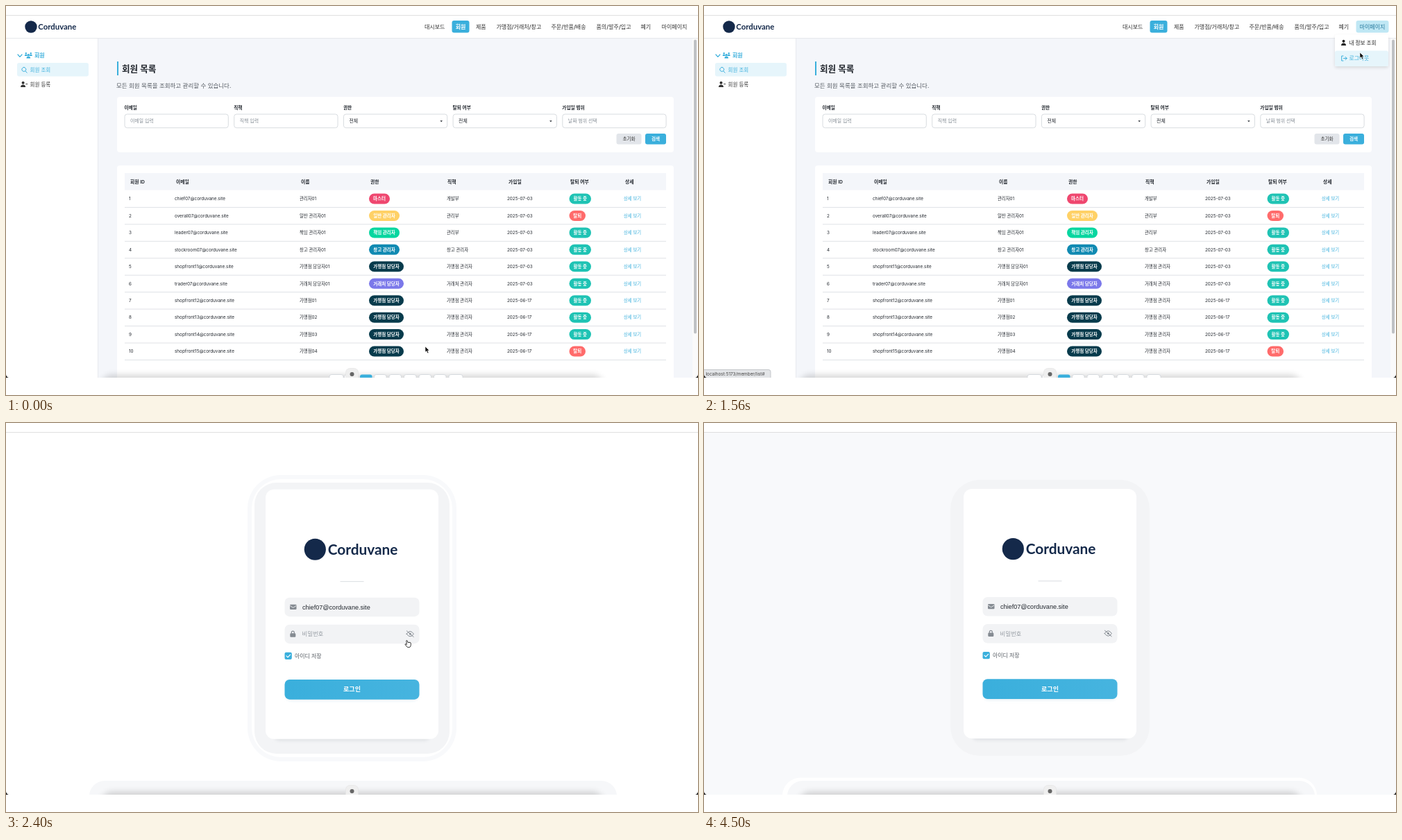
An HTML page that plays this animation: 997 by 561 pixels, repeating every 4.98 s.

```html
<!DOCTYPE html>
<html lang="ko">
<head>
<meta charset="utf-8">
<style>
html, body { margin: 0; width: 100%; height: 100%; overflow: hidden; background: #fff; }
svg { display: block; width: 997px; height: 561px; }
text { font-family: Inter, "Noto Sans CJK KR", "Noto Sans CJK", sans-serif; white-space: pre; }
.brand { font-family: Lato, sans-serif; }
.plain { font-family: "Liberation Sans", Arial, sans-serif; }
</style>
</head>
<body>
<script>
const LOOP = 4980, BLUE = '#3aafdc', PALE = '#e6f5fb', GREY = '#f4f6fa', INK = '#22272e';

// Rectangle; text whose y is its visual middle; stroked line icon.
const box = (x, y, w, h, fill, r = 0, more = '') =>
  `<rect x="${x}" y="${y}" width="${w}" height="${h}" rx="${r}" fill="${fill}" ${more}/>`;
const text = (x, y, s, size, fill = INK, weight = 400, more = '') =>
  `<text x="${x}" y="${y + size * .36}" font-size="${size}" fill="${fill}" font-weight="${weight}" ${more}>${s}</text>`;
const icon = (d, color, width = 1) =>
  `<path d="${d}" fill="none" stroke="${color}" stroke-width="${width}" stroke-linecap="round" stroke-linejoin="round"/>`;
const mid = 'text-anchor="middle"';
const border = 'stroke="#ced3d9" stroke-width=".8"';

const brand = (x, y, r, size) =>
  `<circle cx="${x}" cy="${y}" r="${r}" fill="#14294a"/>` +
  text(x + r * 1.18, y, 'Corduvane', size, '#14294a', 700, 'class="brand"');
const person = (x, y, color, scale = 1) =>
  `<g fill="${color}" transform="translate(${x} ${y}) scale(${scale})"><circle cy="-2.2" r="2"/>
   <path d="M-3.5 4q0-3.6 3.5-3.6t3.5 3.6z"/></g>`;
const badge = (x, y, w, s, color) =>
  box(x, y - 7.5, w, 15, color, 7.5) + text(x + w / 2, y, s, 6.5, '#fff', 600, mid);

function header() {
  const nav = [[603, '대시보드'], [677, '제품'], [706.5, '가맹점/거래처/창고'], [785.5, '주문/반품/배송'],
    [850.5, '품의/발주/입고'], [914.5, '폐기']];
  return box(0, 14, 997, 32.5, '#fff') + box(0, 46, 997, 1, '#e6e8ec') + brand(36, 30, 8.7, 11.4) +
    nav.map(([x, s]) => text(x, 30, s, 8, '#333', 500)).join('') +
    box(642.5, 21, 25, 17.5, BLUE, 3) + text(655, 30, '회원', 8, '#fff', 600, mid) +
    box(939.5, 21, 47, 17.5, 'none', 3, 'id="myBg"') +
    text(963, 30, '마이페이지', 8, '#333', 500, mid + ' id="my"');
}

function sidebar() {
  return box(0, 47, 132, 489, '#fff') + box(132, 47, 1, 489, '#e8eaee') +
    icon('M17 70l3 3.3 3-3.3', BLUE, 1.2) +
    person(28.8, 69.5, BLUE, .6) + person(35.8, 69.5, BLUE, .6) + person(32.3, 72.3, BLUE, .8) +
    text(41, 71, '회원', 8, BLUE, 600) +
    box(16, 82, 103, 19.5, PALE, 3) +
    icon('M28.2 94.2l2 2M25.8 88.4a3 3 0 1 0 .1 0', BLUE) + text(34.5, 92, '회원 조회', 7.5, BLUE) +
    person(24.6, 113, '#333') + icon('M28.8 112.5h2', '#333', .9) + text(34.5, 113, '회원 등록', 7.5, '#333');
}

function filters() {
  const fields = [['이메일', '이메일 입력'], ['직책', '직책 입력'], ['권한', '전체', 1],
    ['탈퇴 여부', '전체', 1], ['가입일 범위', '날짜 범위 선택']];
  return box(160, 131, 802, 80, '#fff', 4) + fields.map(([label, hint, select], i) => {
    const x = 171 + i * 157.7;
    return text(x - .5, 147, label, 6.7, INK, 600) + box(x, 156, 149.3, 19.7, '#fff', 3.5, border) +
      text(x + 8, 166, hint, 6.9, select ? INK : '#868e96', select ? 500 : 400) +
      (select ? `<path d="M${x + 139} 165.3h3.6l-1.8 2z" fill="${INK}"/>` : '');
  }).join('') +
    box(879.5, 184, 36, 15.5, '#e2e5ea', 3) + text(897.5, 192, '초기화', 6.6, '#333', 500, mid) +
    box(921, 184, 30, 15.5, BLUE, 3) + text(936, 192, '검색', 6.6, '#fff', 600, mid);
}

function table() {
  const roles = {
    '마스터': ['#ef476f', 30], '일반 관리자': ['#ffd166', 44], '책임 관리자': ['#06d6a0', 44],
    '창고 관리자': ['#118ab2', 44], '가맹점 담당자': ['#073b4c', 50], '거래처 담당자': ['#7b78ea', 50]
  };
  const rows = [
    ['chief07', '관리자01', '마스터', '개발부'],
    ['overall07', '일반 관리자01', '일반 관리자', '관리부'],
    ['leader07', '책임 관리자01', '책임 관리자', '관리부'],
    ['stockroom07', '창고 관리자01', '창고 관리자', '창고 관리자'],
    ['shopfront11', '가맹점 담당자01', '가맹점 담당자', '가맹점 관리자'],
    ['trader07', '거래처 담당자01', '거래처 담당자', '거래처 관리자']
  ];
  for (let i = 1; i < 5; i++)
    rows.push(['shopfront1' + (i + 1), '가맹점0' + i, '가맹점 담당자', '가맹점 관리자']);
  const heads = [[179, '회원 ID'], [245, '이메일'], [425, '이름'], [525, '권한'], [636, '직책'],
    [724, '가입일'], [813, '탈퇴 여부'], [892, '상세']];

  return box(160, 230, 802, 320, '#fff', 4) + box(171, 241, 780, 24.5, GREY) +
    heads.map(([x, s]) => text(x, 253.5, s, 6.8, INK, 600)).join('') +
    rows.map(([user, name, role, post], i) => {
      const y = 278 + i * 24.45, [color, w] = roles[role], left = i == 1 || i == 9;
      const cell = (x, s, c) => text(x, y, s, 6.35, c);
      return cell(177, i + 1) + cell(243, user + '@corduvane.site') + cell(423, name) +
        badge(523, y, w, role, color) + cell(635, post) +
        cell(722, i < 6 ? '2025-07-03' : '2025-06-17') +
        (left ? badge(811.5, y, 23.5, '탈퇴', '#ff6b6b') : badge(811.5, y, 31.5, '활동 중', '#1fc3b4')) +
        cell(890, '상세 보기', BLUE) + box(171, y + 11.9, 780, 1, '#dfe2e6');
    }).join('');
}

function pager() {
  let out = '';
  for (let i = 0; i < 9; i++)
    out += box(466 + i * 21.5 + (i == 2), 531.5, i % 8 ? 17.5 : 20, 18, i == 2 ? BLUE : '#fff', 3, i == 2 ? '' : border);
  return out;
}

const menu = () => box(909, 41.5, 77, 45.5, '#fff', 3, 'filter="url(#drop)"') +
  box(909, 41.5, 77, 22.5, PALE, 3, 'id="item1"') + box(909, 64.5, 77, 22.5, PALE, 3, 'id="item2"') +
  person(921.5, 53, '#222') + text(929.5, 53, '내 정보 조회', 7.6, '#222', 500, 'id="label1"') +
  icon('M921 72h-2.3v7h2.3M921.5 75.5h4.5M924 73.3l2.2 2.2-2.2 2.2', BLUE) +
  text(929.5, 75.5, '로그아웃', 7.8, BLUE, 500, 'id="label2"');

const status = () => box(-3, 524.5, 99, 15, '#e3e5e8', 3, 'stroke="#b9bcc0" stroke-width=".8"') +
  text(2.5, 531, 'localhost:5173/member/list#', 6.4, '#444');

const halo = () => `<g id="rings">` + box(348, 75, 301, 413, '#f8f9fb', 48) + box(354, 81, 289, 401, '#fff', 42) +
  box(358, 86, 281, 391, '#f3f4f6', 32) + '</g>' + box(355, 82, 287, 398, '#f3f4f6', 42, 'id="ring"');

const form = () => box(386, 430, 225, 28, '#e2e4e7', 8, 'filter="url(#haze)"') + box(374, 95, 249, 360, '#fff', 12) +
  brand(445.3, 181.6, 15.6, 20.8) + box(481.5, 227.3, 34, 1.2, '#dfe2e5') +
  box(401.5, 251, 194, 27.5, '#f2f3f5', 7) + box(401.5, 290, 194, 27.5, '#f2f3f5', 7) +
  box(409, 261, 9.5, 7.3, '#858b92', 1.3) + icon('M409.5 263l4.2 2.7 4.2-2.7', '#f2f3f5', .9) +
  text(427, 264.7, 'chief07@corduvane.site', 9.1, INK, 400, 'class="plain"') +
  box(409.3, 302.6, 8, 5.4, '#858b92', 1.2) + icon('M411.3 302.5v-1.1a2 2 0 0 1 4 0v1.1', '#858b92', 1.2) +
  text(426.5, 303.5, '비밀번호', 8.4, '#969ca3') +
  icon('M577.2 303.5q5-7.5 10.2 0q-5.2 7.5-10.2 0zM577.4 299.2l9.8 8.6', '#858b92') +
  `<circle cx="582.3" cy="303.5" r="1.4" fill="#858b92"/>` +
  box(401.5, 330, 10.3, 10.3, BLUE, 2) + icon('M404 335.2l2 2 3.6-3.8', '#fff', 1.2) +
  text(416, 335.2, '아이디 저장', 7.9, '#555b62') +
  box(403, 372, 191, 27.5, '#e4eff4', 7, 'filter="url(#haze)"') +
  box(401.5, 369.3, 194, 28.7, 'url(#button)', 7) + text(498.5, 383.4, '로그인', 9, '#fff', 600, mid);

const dock = () => `<g id="dockHalo">` + box(113, 511.5, 770, 60, '#fff', 26) +
  box(120, 516, 760, 60, '#f6f7f9', 22) + '</g>' +
  box(136, 532, 726, 50, '#000', 18, 'opacity=".16" filter="url(#blur)"');

document.body.innerHTML = `<svg viewBox="0 0 997 561"><defs>
  <filter id="blur" x="-10%" y="-60%" width="120%" height="220%"><feGaussianBlur stdDeviation="5"/></filter>
  <filter id="haze" x="-10%" y="-60%" width="120%" height="220%"><feGaussianBlur stdDeviation="2"/></filter>
  <filter id="drop" x="-20%" y="-60%" width="140%" height="220%"><feDropShadow dx="0" dy="2" stdDeviation="2" flood-opacity=".12"/></filter>
  <linearGradient id="button"><stop stop-color="#3aafdc"/><stop offset="1" stop-color="#46b4df"/></linearGradient>
  <clipPath id="screen"><path d="M0 13h997v523H0z"/></clipPath></defs>
  <g clip-path="url(#screen)">
    <rect id="paper" y="13" width="997" height="523"/>
    <g id="admin">${box(133, 47, 864, 489, GREY)}${header()}${sidebar()}
      ${box(160, 80, 2, 20, BLUE)}${text(167, 90, '회원 목록', 12.6, INK, 700)}
      ${text(159, 115, '모든 회원 목록을 조회하고 관리할 수 있습니다.', 8.5, '#555b62')}
      ${filters()}${table()}${box(989, 47, 8, 489, '#fafafa')}${box(991, 48.5, 4, 424, '#bfc1c4', 2)}
    </g>
    <g id="login">${halo()}<g id="form">${form()}</g></g>
    ${dock()}<g id="pager">${pager()}</g>
    <g id="menu">${menu()}</g><g id="status">${status()}</g>
    ${box(489.5, 522.5, 18, 20, '#efefef', 6, 'stroke="#e2e2e2" stroke-width=".6"')}
    <circle cx="498.5" cy="531" r="3" fill="#666"/>
    <path d="M0 531.5q.6 3.8 4 4.5H0zM997 531.5q-.6 3.8-4 4.5h4z"/>
    <path d="M0 13.4h997" stroke="#dcdcdc"/>
    <g id="cursor" stroke-linejoin="round">
      <path id="arrow" d="M0 0v8.2l1.9-1.7 1.5 3.2 1.5-.7-1.5-3.1h2.5z" stroke="#fff" stroke-width=".6"/>
      <path id="hand" d="M1.8.8q.9-.8 1.5.4l.8 2.4 3-.2q1.2.3 1.2 1.8v2q-.3 2-1.5 3.2H3.4L.2 6.8q-.7-1.2.5-1.1l1.6.8z" fill="#fff" stroke="#222" stroke-width=".9"/>
    </g>
  </g></svg>`;

const $ = id => document.getElementById(id);
const show = (id, on) => $(id).style.display = on ? '' : 'none';
const fill = (id, color) => $(id).setAttribute('fill', color);
const move = (id, x, y) => $(id).setAttribute('transform', `translate(${x} ${y})`);

// Pointer tip: time, x, y
const path = [[450, 604, 491], [800, 973, 36], [1080, 973, 36], [1380, 945, 67], [1800, 945, 67], [1980, 947, 75],
  [2100, 947, 75], [2400, 575, 313], [2540, 577, 340], [3750, 577, 340], [4110, 660, 13]];

function pointer(t) {
  const i = path.findIndex(p => p[0] > t);
  if (i < 1) return path[i ? path.length - 1 : 0].slice(1);
  const [a, b] = [path[i - 1], path[i]];
  const u = (t - a[0]) / (b[0] - a[0]), k = u * u * (3 - 2 * u);
  return [a[1] + (b[1] - a[1]) * k, a[2] + (b[2] - a[2]) * k];
}

function draw(t) {
  const [x, y] = pointer(t);
  const admin = t < 1950, login = t >= 2040, tinted = t >= 4260;
  const open = admin && t >= 1110, over = y < 39 && x > 939;
  const onFirst = y > 41 && y < 64;

  show('admin', admin);
  show('pager', admin);
  show('login', login);
  show('menu', open);
  show('status', open && t >= 1200);
  show('dockHalo', !admin);
  show('rings', !tinted);
  show('ring', tinted);
  fill('paper', tinted ? '#f8f9fb' : '#fff');

  fill('myBg', open ? '#bfe7f4' : over ? PALE : 'none');
  fill('my', open ? '#24789c' : over ? BLUE : '#333');
  show('item1', onFirst);
  show('item2', y >= 64);
  fill('label1', onFirst ? BLUE : '#222');
  fill('label2', y >= 64 ? BLUE : '#222');

  move('form', 0, login ? 4 * Math.exp((2040 - t) / 200) : 0);

  const hand = login && x > 570 && x < 592 && y > 291 && y < 318 && t < 3000;
  show('cursor', t < 4110);
  show('hand', hand);
  show('arrow', !hand);
  move('cursor', x, y);
}

const start = performance.now();
function tick() {
  draw((performance.now() - start) % LOOP);
  requestAnimationFrame(tick);
}
tick();
</script>
</body>
</html>
```
